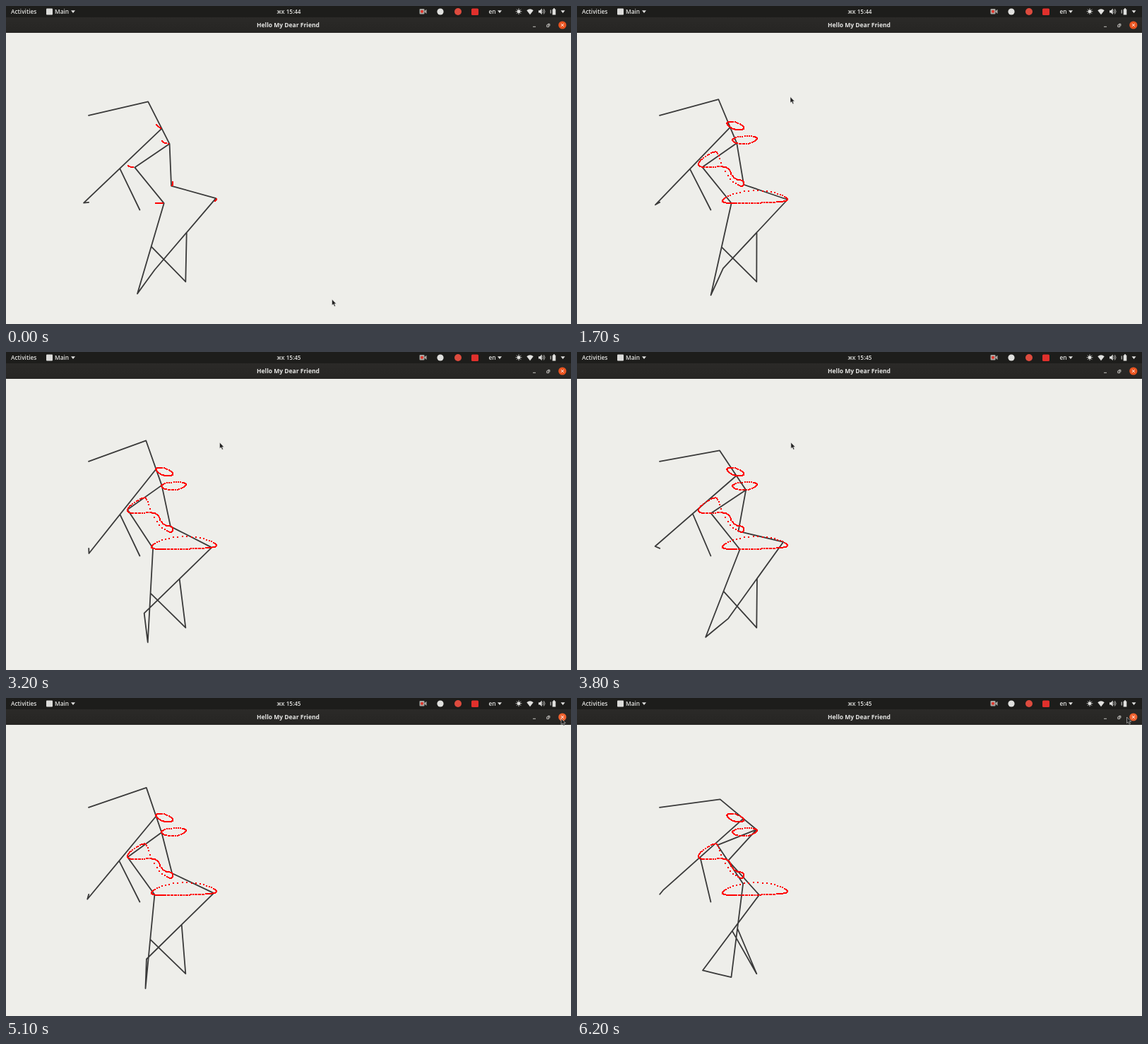
Recreate the animation shown at these times as an HTML page. Size 800 by 450 pixels, loop 6.3 s.

```html
<!DOCTYPE html>
<html lang="en">
<head>
<meta charset="utf-8">
<title>Walking linkage</title>
<style>
html, body { margin: 0; width: 100%; height: 100%; overflow: hidden; background: #eeeeea; }
svg { display: block; width: 800px; height: 450px; }
text { font-family: "Open Sans", "Noto Sans", sans-serif; font-size: 8.3px; font-weight: 600; fill: #e4e4e2; }
#clock { font-size: 8.1px; }
#title { font-size: 8.5px; font-weight: 700; }
</style>
</head>
<body>
<svg viewBox="0 0 800 450">
  <defs>
    <linearGradient id="bar" x1="0" y1="0" x2="0" y2="1">
      <stop offset="0" stop-color="#2b2a28"/>
      <stop offset="1" stop-color="#262523"/>
    </linearGradient>
  </defs>
  <rect width="800" height="450" fill="#eeeeea"/>
  <rect width="800" height="16" fill="#1d1d1b"/>
  <rect y="16" width="800" height="22" fill="url(#bar)"/>

  <text x="7" y="11">Activities</text>
  <rect x="57" y="3.5" width="9" height="9" rx="1" fill="#dcdcda"/>
  <text x="69" y="11">Main</text>
  <text id="clock" x="400.5" y="10.7" text-anchor="middle"></text>
  <text x="683.5" y="10.7">en</text>
  <g fill="#e0e0de">
    <path d="M92 6.3h6l-3 3.6zM696 6.3h6l-3 3.6zM785.5 6.3h6l-3 3.6z"/>
    <rect x="585.5" y="4" width="7" height="7.5" rx="1" fill="#a9a6a2"/>
    <path d="M592.5 7l3-2.3v6.2l-3-2.3z" fill="#a9a6a2"/>
    <circle cx="589" cy="7.8" r="2.1" fill="#e0352b"/>
    <circle cx="615" cy="8" r="4.6"/>
    <circle cx="640" cy="8" r="5" fill="#dd4b3e"/>
    <rect x="659" y="3.5" width="10" height="9.5" rx="1.5" fill="#e0302c"/>
    <circle cx="726" cy="7.7" r="2.3"/>
    <path d="M726 3.3v8.8M721.6 7.7h8.8M722.9 4.6l6.2 6.2M729.1 4.6l-6.2 6.2" stroke="#e0e0de" stroke-width=".8"/>
    <path d="M737.3 6.2q4.7-4 9.4 0l-4.7 6z"/>
    <path d="M754 6.2h2l2.7-2.6v8.4l-2.7-2.6h-2z"/>
    <path d="M760 5.5q1.8 2.3 0 4.6M761.5 4.2q3 3.6 0 7.2" fill="none" stroke="#e0e0de" stroke-width=".8"/>
    <path d="M773.7 4.5h1.3v-1.2h2v1.2h1.3v8h-4.6z"/>
    <path d="M771.2 5.5v5" stroke="#e0e0de"/>
  </g>

  <text id="title" x="399.5" y="29.8" text-anchor="middle">Hello My Dear Friend</text>
  <g fill="none" stroke="#d5d3cf" stroke-width=".9">
    <path d="M746 29.3h4M765.8 26.8h2.8v2.8h-2.8zM767 25.4h2.9v2.9"/>
  </g>
  <circle id="close" cx="787.8" cy="27" r="5.6"/>
  <path d="M785.8 25l4 4M789.8 25l-4 4" stroke="#fff" stroke-width=".9"/>

  <path id="bars" fill="none" stroke="#3a3a3a" stroke-width="1.8" stroke-linecap="round" stroke-linejoin="round"/>
  <path id="trail" fill="#f00"/>
  <path id="mouse" d="M0 0v8.6l2-1.7 1.5 3.3 1.5-.7-1.4-3.1h2.6z" fill="#222" stroke="#f6f6f4" stroke-width=".5"/>
</svg>
<script>
const LOOP = 6300, FRAME = 100;
const $ = id => document.getElementById(id);
const RAD = Math.PI / 180;

// fixed pivots
const armPivot = [117, 154.8], hipCrank = [117.2, 277.8], hipPivot = [189.4, 288.5];
const legCrank = [198.2, 390.3], legPivot = [254.3, 390.2];

// [ms, crank degrees] and [ms, x, y]
const turn = [[0, 126], [900, 217.5], [2400, 362], [3200, 443], [4400, 558], [5100, 632], [6200, 733.5]];
const pointer = [[0, 461.5, 415], [900, 236, 201], [1500, 302, 128.5], [2400, 302, 128.5], [3200, 302.5, 128],
  [4000, 303, 128], [4200, 311, 127], [4400, 503, 93], [4600, 650, 62], [4900, 780, 34], [5000, 786, 29],
  [5600, 786.5, 29], [6200, 778.5, 27]];
const TRAIL_START = 97, TRAIL_STEP = 5, TRAIL_MAX = 180 / TRAIL_STEP;

function track(keys, t) {
  let i = 0;
  while (i < keys.length - 2 && t >= keys[i + 1][0]) i++;
  const a = keys[i], b = keys[i + 1], k = (t - a[0]) / (b[0] - a[0]);
  return a.slice(1).map((v, n) => v + (b[n + 1] - v) * k);
}

const polar = (c, r, deg) => [c[0] + r * Math.cos(deg * RAD), c[1] + r * Math.sin(deg * RAD)];
const extend = (a, b, k) => [a[0] + (b[0] - a[0]) * k, a[1] + (b[1] - a[1]) * k];

// joint at distance ra from a and rb from b
function joint(a, b, ra, rb, side = 1) {
  const dx = b[0] - a[0], dy = b[1] - a[1], d = Math.hypot(dx, dy);
  const m = (d * d + ra * ra - rb * rb) / (2 * d);
  const h = side * Math.sqrt(Math.max(0, ra * ra - m * m));
  return [a[0] + (dx * m + dy * h) / d, a[1] + (dy * m - dx * h) / d];
}

function leg(deg, hip) {
  const crank = polar(legCrank, 20.8, deg);
  const mid = joint(crank, legPivot, 69.7, 69.7);
  const foot = extend(crank, mid, 133.4 / 69.7);
  const knee = joint(hip, foot, 59.5, 65.5, -1);
  return { crank, mid, foot, knee };
}

function pose(deg) {
  const pin = polar(hipCrank, 7.2, 2 * deg - 78);
  const rock = joint(pin, hipPivot, 70.5, 65);
  const tip = extend(pin, rock, 152.5 / 70.5);
  const elbow = joint(armPivot, tip, 86.4, 42.7);
  const hip = extend(elbow, tip, 67 / 42.7);
  return { pin, rock, tip, elbow, hip, legs: [leg(deg, hip), leg(deg + 180, hip)] };
}

const line = (...pts) => "M" + pts.map(p => p.map(v => v.toFixed(2)).join(" ")).join("L");
const dot = p => `M${Math.round(p[0] - 1)} ${Math.round(p[1] - 1)}h2v2h-2z`;

function drawBars(p) {
  let d = line(armPivot, p.elbow, p.hip) + line(hipCrank, p.pin, p.tip) + line(p.rock, hipPivot);
  for (const l of p.legs)
    d += line(p.hip, l.knee, l.foot, l.crank, legCrank) + line(l.mid, legPivot);
  $("bars").setAttribute("d", d);
}

function drawTrail(deg) {
  const n = Math.min(TRAIL_MAX, Math.floor((deg - TRAIL_START) / TRAIL_STEP));
  let d = "";
  for (let i = 0; i <= n; i++) {
    const p = pose(TRAIL_START + i * TRAIL_STEP);
    d += dot(p.tip) + dot(p.hip);
    for (const l of p.legs) d += dot(l.knee) + dot(l.foot);
  }
  $("trail").setAttribute("d", d);
}

function draw(ms) {
  const t = Math.floor((ms % LOOP) / FRAME) * FRAME;
  const [deg] = track(turn, t);
  drawBars(pose(deg));
  drawTrail(deg);
  $("mouse").setAttribute("transform", `translate(${track(pointer, t)})`);
  $("clock").textContent = t < 2600 ? "жк 15:44" : "жк 15:45";
  $("close").setAttribute("fill", t < 5000 ? "#e95420" : "#f0622f");
}

const start = performance.now();
function tick() {
  draw(performance.now() - start);
  requestAnimationFrame(tick);
}
tick();
</script>
</body>
</html>
```
